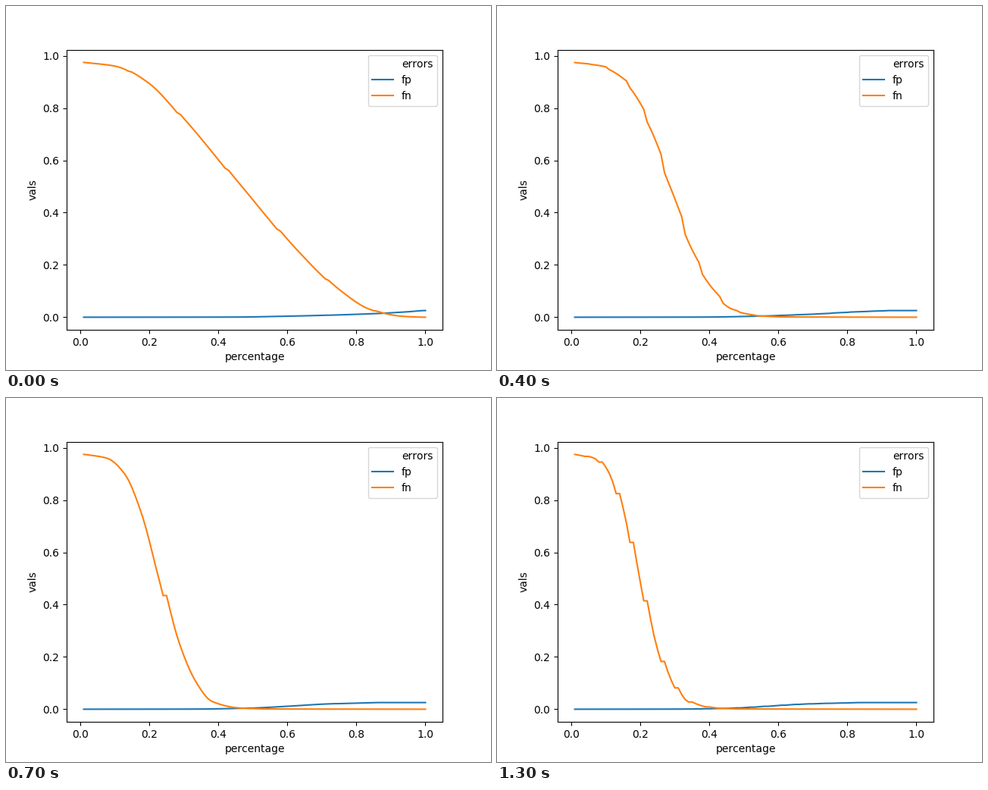
These frames come from a looping animation (640 by 480 pixels, 1.4 s). A matplotlib script:

```python
import numpy as np
import matplotlib.pyplot as plt
from matplotlib.animation import FuncAnimation

FRAMES, INTERVAL = 14, 100
LAST = FRAMES - 1
PERCENT = np.arange(1, 101)
TOP = 0.9745

# Percentages at which each curve reaches its levels, first and last pose.
FN_LEVELS = np.array([TOP, .96, .9, .75, .5, .25, .1, .03, .005, .001, 0])
FN_START = np.array([1, 10.3, 19.3, 30.5, 46.7, 63.3, 75.5, 84.1, 92.2, 97, 100])
FN_END = np.array([1, 6.7, 11.15, 15.4, 19.85, 24.7, 29.6, 33.9, 42, 50, 100])

FP_LEVELS = np.array([0, .0005, .004, .012, .02, 1 - TOP])
FP_START = np.array([1, 44, 60, 82, 94, 99.5])
FP_END = np.array([1, 31, 46.5, 57.5, 68, 84])

# The number of distinct scores shrinks, which makes the steps in the curves.
SCORE_TIMES = [0, 3, 5, 7, 9, 11, 13]
SCORE_COUNTS = [193, 128.1, 109, 95.95, 89.15, 82.05, 77.13]


def remaining(frame, tau, power):
    """Share of the way still to go: 1 at the start, 0 in the last frame."""
    def decay(t):
        return np.exp(-(t / tau) ** power)
    return (decay(frame) - decay(LAST)) / (1 - decay(LAST))


def monotone(x, knots, levels):
    """Monotone cubic interpolation."""
    h = np.diff(knots)
    slope = np.diff(levels) / h
    left, right = slope[:-1], slope[1:]
    m = np.r_[slope[0], 2 * left * right / (left + right), slope[-1]]
    i = np.clip(np.searchsorted(knots, x, side="right") - 1, 0, len(h) - 1)
    t = np.clip((x - knots[i]) / h[i], 0, 1)
    return ((1 + 2 * t) * (1 - t) ** 2 * levels[i]
            + t * t * (3 - 2 * t) * levels[i + 1]
            + h[i] * t * (1 - t) * ((1 - t) * m[i] - t * m[i + 1]))


def curves(frame):
    scores = np.interp(frame, SCORE_TIMES, SCORE_COUNTS)
    x = 100 * (np.ceil(PERCENT * scores / 100 - 1e-9) - 0.5) / scores
    # High levels set off later than low ones.
    fn_left = remaining(frame, 3 + 3.2 * FN_LEVELS ** 2,
                        1 + 1.3 * FN_LEVELS ** 4)
    fp_left = remaining(frame, 5, 2)
    fn_knots = FN_END + (FN_START - FN_END) * fn_left
    fp_knots = FP_END + (FP_START - FP_END) * fp_left
    return monotone(x, fp_knots, FP_LEVELS), monotone(x, fn_knots, FN_LEVELS)


plt.rcParams["text.kerning_factor"] = 6
fig, ax = plt.subplots(figsize=(6.4, 4.8), dpi=100)
ax.plot([], [], ls="none", label="errors")
fp_line, = ax.plot([], [], color="C0", label="fp")
fn_line, = ax.plot([], [], color="C1", label="fn")
ax.set(xlim=(-0.0395, 1.0495), ylim=(-0.05 * TOP, 1.05 * TOP),
       xlabel="percentage", ylabel="vals")
ax.legend(loc="upper right")


def update(frame):
    for line, values in zip((fp_line, fn_line), curves(frame)):
        line.set_data(PERCENT / 100, values)
    return fp_line, fn_line


anim = FuncAnimation(fig, update, frames=FRAMES, interval=INTERVAL,
                     repeat=True, repeat_delay=0)
plt.show()
```
